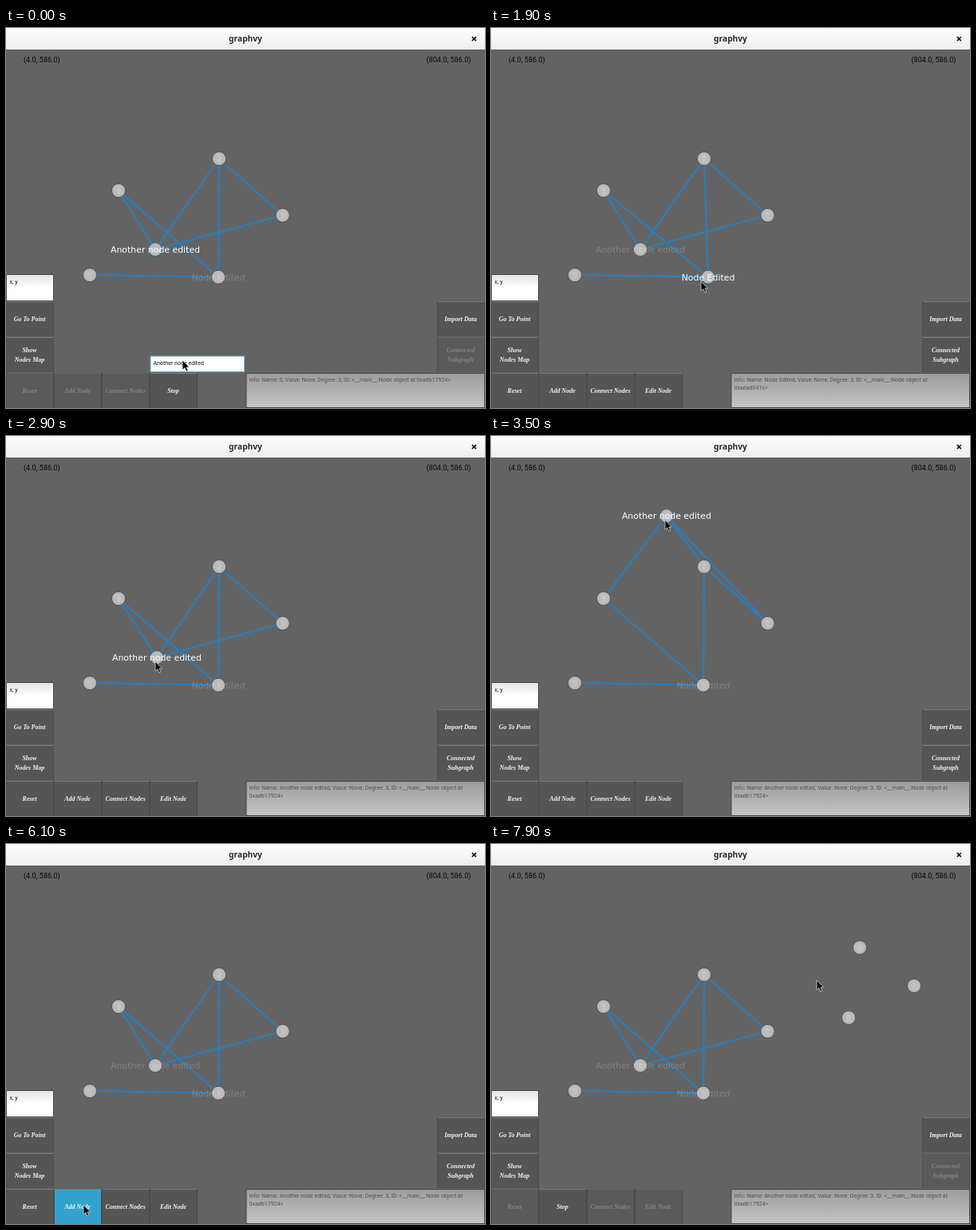
Recreate the animation shown at these times as an HTML page. Size 600 px wide and 477 px high, loop 8 s.

```html
<!DOCTYPE html>
<html lang="en">
<head>
<meta charset="utf-8">
<title>graphvy</title>
<style>
  html, body { margin: 0; width: 100%; height: 100%; overflow: hidden; background: #646364; }
  svg { display: block; width: 100%; height: 100%; }
  text { font-family: Roboto, sans-serif; font-size: 7.05px; white-space: pre; }
  .title { font: bold 10.2px "Noto Sans", sans-serif; fill: #2a2a2a; text-anchor: middle; }
  .corner { font-size: 9.1px; fill: #080808; }
  .button text { font: italic bold 8px "Liberation Serif", serif; fill: #f4f4f4; text-anchor: middle; }
  .button rect { fill: #565556; }
  .button .top { stroke: #7c7b7c; }
  .button .sides { stroke: #4d4c4d; fill: none; }
  .button.off rect { fill: #5b5a5b; }
  .button.off .top { stroke: #666566; }
  .button.off text { fill: #858485; }
  .button.down rect { fill: #32a3cf; }
  .node circle { fill: url(#ball); stroke: #4c4b4c; stroke-width: .8; }
  .node.on circle { stroke: #2d6f83; stroke-width: 1.2; }
  .node text { font: 10.9px "DejaVu Sans", sans-serif; fill: #fff; fill-opacity: .2; text-anchor: middle; }
  .node.on text { fill-opacity: 1; }
  .edge { stroke: #267fbe; stroke-width: 2.1; }
  .info { fill: #505050; }
</style>
</head>
<body>
<svg viewBox="0 0 600 477" preserveAspectRatio="none">
  <defs>
    <linearGradient id="bar" x2="0" y2="1"><stop stop-color="#fcfcfc"/><stop offset="1" stop-color="#eee"/></linearGradient>
    <linearGradient id="field" x2="0" y2="1"><stop stop-color="#e4e3e4"/><stop offset=".5" stop-color="#fff"/><stop offset="1" stop-color="#fff"/></linearGradient>
    <linearGradient id="panel" x2="0" y2="1"><stop stop-color="#9d9c9d"/><stop offset="1" stop-color="#c6c5c6"/></linearGradient>
    <radialGradient id="ball"><stop stop-color="#bfbebf"/><stop offset=".8" stop-color="#bbbabb"/><stop offset="1" stop-color="#a9a8a9"/></radialGradient>
    <clipPath id="canvas"><rect y="27" width="600" height="450"/></clipPath>
  </defs>
  <rect width="600" height="477" fill="#646364"/>
  <text class="corner" x="22" y="43">(4.0, 586.0)</text>
  <text class="corner" x="526.5" y="43">(804.0, 586.0)</text>
  <g id="graph" clip-path="url(#canvas)"></g>
  <g id="buttons"></g>
  <rect x=".5" y="309.5" width="59" height="33" fill="url(#field)" stroke="#4b4a4b"/>
  <text x="4.5" y="321" fill="#111">x, y</text>
  <rect x="301" y="433.5" width="298.5" height="43" fill="url(#panel)" stroke="#494849"/>
  <text class="info" x="304.5" y="444.3"></text>
  <text class="info" x="304.5" y="454.3"></text>
  <g id="editor">
    <rect x="181" y="412" width="117.5" height="19.5" fill="#fff" stroke="#62b5cb"/>
    <text x="184.5" y="422.5" fill="#111">Another node edited</text>
  </g>
  <rect width="600" height="27" fill="url(#bar)"/>
  <text class="title" x="300" y="17.2">graphvy</text>
  <path d="M583.8 11.2l5 5m0-5l-5 5" stroke="#222" stroke-width="1.8"/>
  <path id="cursor" d="M0 0V12.2L2.8 9.6L4.9 14.1L6.9 13.1L4.9 8.9H8.6Z" fill="#0a0a0a" stroke="#e4e4e4" stroke-width=".7"/>
</svg>
<script>
const TICK = 100, TICKS = 80;
const STOP_EDIT = 7, PRESS_ADD = 61;
const $ = id => document.getElementById(id);
const within = (t, [from, to]) => t >= from && t < to;
const ease = k => k * k * (3 - 2 * k);

function add(parent, tag, attrs = {}, text = '') {
  const el = document.createElementNS('http://www.w3.org/2000/svg', tag);
  for (const key in attrs) el.setAttribute(key, attrs[key]);
  el.textContent = text;
  return parent.appendChild(el);
}

// grip: pointer offset from the centre of a dragged node
const nodes = {
  A: { x: 267, y: 164, label: '2' },
  B: { x: 141, y: 204, label: '3' },
  C: { x: 346.5, y: 235, label: '1' },
  D: { x: 187, y: 278, label: 'Another node edited', held: [27, 43], lit: [27, 48], grip: [-2, 5] },
  E: { x: 266, y: 312.6, label: 'Node Edited', held: [17, 24], lit: [17, 24], grip: [-9, 5.4] },
  F: { x: 105, y: 310, label: '5' },
  G: { x: 462, y: 130, label: '6', born: 69 },
  H: { x: 530, y: 178, label: '7', born: 72 },
  I: { x: 448, y: 218, label: '8', born: 75 }
};
const { D, E, G, H, I } = nodes;
const spot = ({ x, y, grip: [dx, dy] = [0, 2] }) => [x + dx, y + dy];

const moves = [
  { during: [0, 2], to: [254, 311] },
  { during: [2, 5], to: [219, 450] },
  { during: [8, 12], to: [277, 294] },
  { during: [12, 15], to: [272, 265] },
  { during: [15, 17], to: spot(E) },
  { during: [24, 27], to: spot(D) },
  { during: [42, 44], to: [187, 278] },
  { during: [46, 50], to: [189, 269] },
  { during: [51, 57], to: [97, 453] },
  { during: [61, 67], to: spot(G) },
  { during: [69, 71], to: spot(H) },
  { during: [73, 75], to: spot(I) },
  { during: [75, 77], to: [457, 174] },
  { during: [77, 79], to: [408, 171] }
];

// Hand motion added while a node is held
function sway(t) {
  if (within(t, E.held)) return [6 * Math.sin((t - 17) * Math.PI / 4), 0];
  if (within(t, [27, 33])) return [2.3 * Math.sin((t - 27) * Math.PI / 3), 0];
  if (within(t, [33, 43])) {
    const swing = Math.sin((t - 33) * Math.PI / 8.75);
    return [50 * swing, -270 * swing];
  }
  return [0, 0];
}

function pointer(t) {
  let [x, y] = [221, 417];
  for (const { during: [from, to], to: [tx, ty] } of moves) {
    if (t <= from) break;
    const k = ease(Math.min(1, (t - from) / (to - from)));
    x += (tx - x) * k;
    y += (ty - y) * k;
  }
  const [dx, dy] = sway(t);
  return [x + dx, y + dy];
}

const edges = 'BD BE AD AE AC CD FE'.split(' ').map(([a, b]) =>
  ({ a: nodes[a], b: nodes[b], el: add($('graph'), 'line', { class: 'edge' }) }));
for (const n of Object.values(nodes)) {
  n.el = add($('graph'), 'g');
  add(n.el, 'circle', { r: 8.6 });
  add(n.el, 'text', { y: 4 }, n.label);
}

function button(x, y, ...lines) {
  const g = add($('buttons'), 'g', { class: 'button' });
  add(g, 'rect', { x: x + 1, y, width: 58.5, height: 44 });
  add(g, 'path', { class: 'top', d: `M${x + 1} ${y + .5}h58.5` });
  add(g, 'path', { class: 'sides', d: `M${x + .5} ${y}v44m59 0v-44` });
  lines.forEach((line, i) =>
    add(g, 'text', { x: x + 29.5, y: y + 25.2 + (i - (lines.length - 1) / 2) * 12 }, line));
  return g;
}
button(0, 343, 'Go To Point');
button(0, 388, 'Show', 'Nodes Map');
button(540, 343, 'Import Data');
const subgraph = button(540, 388, 'Connected', 'Subgraph');
const tools = ['Reset', 'Add Node', 'Connect Nodes', 'Edit Node']
  .map((name, i) => ({ name, el: button(i * 60, 433, name) }));

function info(t) {
  const line = name => `Info: Name: ${name}, Value: None, Degree: 3, ID: <__main__.Node object at`;
  if (t < E.held[0]) return [line('0') + ' 0xadb17924>', ''];
  return t < D.held[0] ? [line(E.label), '0xadad041c>'] : [line(D.label), '0xadb17924>'];
}

function drawGraph(t, [px, py]) {
  for (const n of Object.values(nodes)) {
    const held = n.held && within(t, n.held);
    const lit = n.lit && within(t, n.lit) || n === D && t <= STOP_EDIT;
    n.cx = held ? px - n.grip[0] : n.x;
    n.cy = held ? py - n.grip[1] : n.y;
    n.el.setAttribute('class', lit ? 'node on' : 'node');
    n.el.setAttribute('transform', `translate(${n.cx} ${n.cy})`);
    n.el.style.display = t >= (n.born || 0) ? '' : 'none';
  }
  for (const { a, b, el } of edges) {
    const ends = { x1: a.cx, y1: a.cy, x2: b.cx, y2: b.cy };
    for (const key in ends) el.setAttribute(key, ends[key]);
  }
}

function drawControls(t) {
  const mode = t <= STOP_EDIT ? 'Edit Node' : t > PRESS_ADD ? 'Add Node' : '';
  const pressed = { [STOP_EDIT]: 'Edit Node', [PRESS_ADD]: 'Add Node' }[t];
  for (const { name, el } of tools) {
    const off = mode && name !== mode;
    el.setAttribute('class', 'button' + (off ? ' off' : '') + (name === pressed ? ' down' : ''));
    el.querySelector('text').textContent = name === mode ? 'Stop' : name;
  }
  subgraph.setAttribute('class', mode ? 'button off' : 'button');
  $('editor').style.display = t <= STOP_EDIT ? '' : 'none';
  const lines = info(t);
  document.querySelectorAll('.info').forEach((el, i) => { el.textContent = lines[i]; });
}

function render(now) {
  const t = Math.floor(now / TICK) % TICKS;
  const at = pointer(t);
  $('cursor').setAttribute('transform', `translate(${at})`);
  drawGraph(t, at);
  drawControls(t);
}

const start = performance.now();
function loop() {
  render(performance.now() - start);
  requestAnimationFrame(loop);
}
loop();
</script>
</body>
</html>
```
